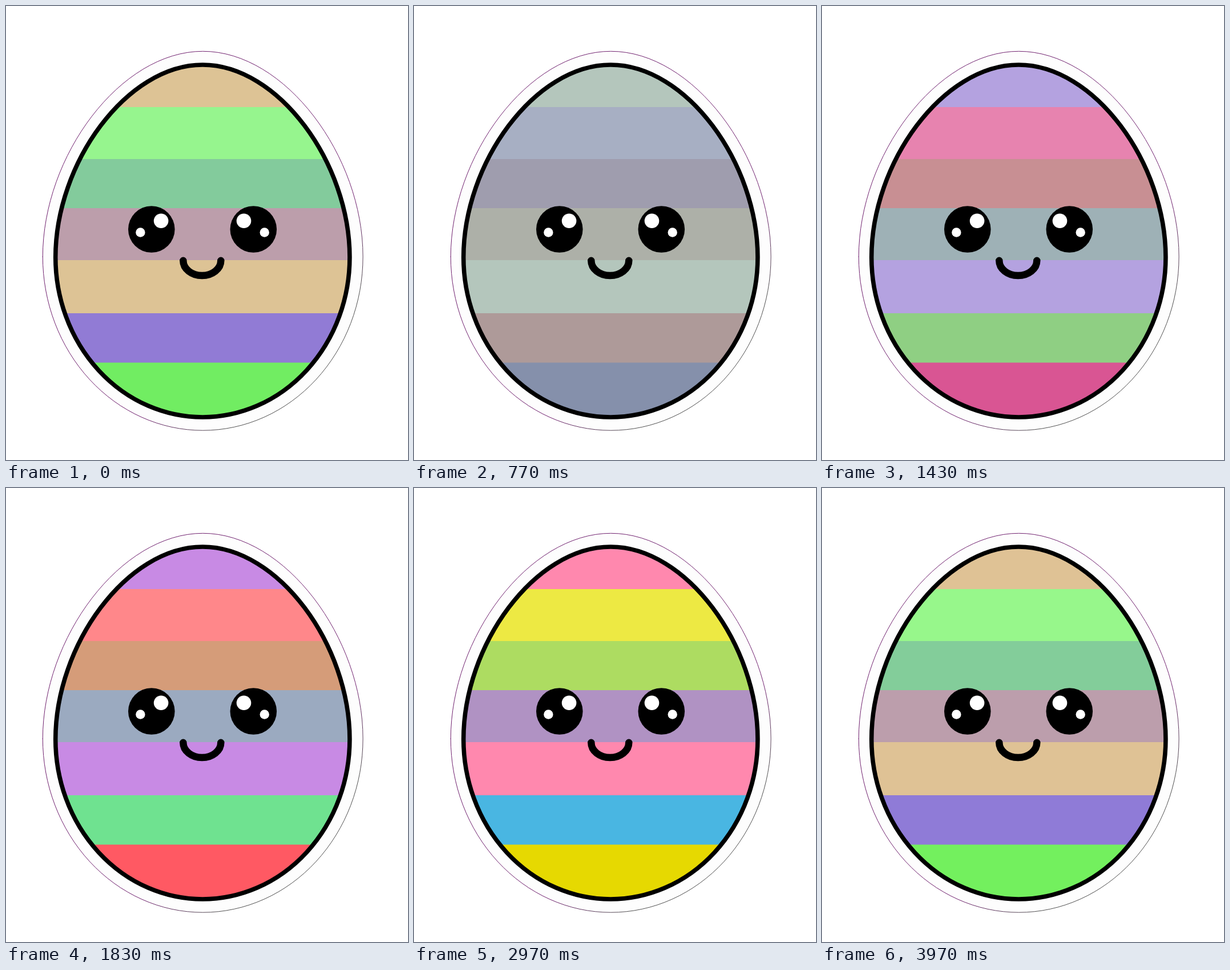
An HTML page with a canvas that plays this animation: 704 by 795 pixels, repeating every 4010 ms.

```html
<!DOCTYPE html>
<html lang="en">
<head>
<meta charset="utf-8">
<title>Egg</title>
<style>
html, body { margin: 0; width: 100%; height: 100%; overflow: hidden; background: #fff; }
canvas { display: block; }
</style>
</head>
<body>
<canvas id="stage" width="704" height="795"></canvas>
<script>
const ctx = document.getElementById('stage').getContext('2d');
const LOOP = 4010, STEPS = 120, STEP = 100 / 3;
const TAU = Math.PI * 2;

// Every stripe blends its own colour with a hue-rotated copy of it.
const BLEND = 0.575;        // share of the rotated copy
const START = 110 / 360;    // turn at time 0

const pink = [252, 128, 186];
const stripes = [
  [95, pink],
  [177, [253, 216, 68]],
  [268, [185, 212, 93]],
  [354, [171, 148, 198]],
  [445, pink],
  [538, [69, 197, 215]],
  [624.5, [251, 194, 3]]
];

// Rotates a colour around the grey axis.
function rotateHue(rgb, turn) {
  return rgb.map((_, k) => rgb.reduce((sum, c, j) =>
    sum + c * (1 + 2 * Math.cos(TAU * (turn - (k - j) / 3))) / 3, 0));
}

function stripeColor(rgb, turn) {
  const mixed = rotateHue(rgb, turn).map((v, k) => rgb[k] + (v - rgb[k]) * BLEND);
  return `rgb(${mixed.map(v => Math.max(0, Math.min(255, Math.round(v))))})`;
}

function eggPath(cx, cy, a, top, bottom) {
  const p = new Path2D();
  const side = cy - 0.49 * (cy - top), cap = 0.515 * a;
  p.moveTo(cx - a, cy);
  p.bezierCurveTo(cx - a, side, cx - cap, top, cx, top);
  p.bezierCurveTo(cx + cap, top, cx + a, side, cx + a, cy);
  p.ellipse(cx, cy, a, bottom - cy, 0, 0, Math.PI);
  p.closePath();
  return p;
}

const shell = eggPath(344.3, 440, 257.6, 103, 720);
const rim = eggPath(344.7, 439, 280.4, 79.3, 743.2);
const rimInk = ctx.createLinearGradient(480, 480, 560, 560);
rimInk.addColorStop(0, '#6f206e');
rimInk.addColorStop(1, '#505050');

function disc(x, y, r, color) {
  ctx.fillStyle = color;
  ctx.beginPath();
  ctx.arc(x, y, r, 0, TAU);
  ctx.fill();
}

function eye(x, side) {
  disc(x, 391, 40.8, '#000');
  disc(x + 16.8 * side, 376.2, 12.8, '#fff');
  disc(x - 19.4 * side, 396.5, 8.2, '#fff');
}

function drawMouth() {
  ctx.lineWidth = 12.5;
  ctx.lineCap = 'round';
  ctx.beginPath();
  ctx.ellipse(343.3, 445.8, 33, 26.3, 0, 0, Math.PI);
  ctx.stroke();
}

function draw(turn) {
  ctx.fillStyle = '#fff';
  ctx.fillRect(0, 0, 704, 795);
  ctx.fillStyle = '#fdfdfd';
  ctx.fill(rim);
  ctx.lineWidth = 1;
  ctx.strokeStyle = rimInk;
  ctx.stroke(rim);

  // Each stripe runs to the bottom and the next one covers it.
  ctx.save();
  ctx.clip(shell);
  for (const [y, rgb] of stripes) {
    ctx.fillStyle = stripeColor(rgb, turn);
    ctx.fillRect(80, y, 530, 730 - y);
  }
  ctx.restore();

  ctx.strokeStyle = '#000';
  ctx.lineWidth = 7.6;
  ctx.stroke(shell);

  eye(254.8, 1);
  eye(433.3, -1);
  drawMouth();
}

const start = performance.now();
function tick() {
  const t = (performance.now() - start) % LOOP;
  const step = Math.min(STEPS - 1, Math.floor((t + 4) / STEP));
  draw(START + step / STEPS);
  requestAnimationFrame(tick);
}
tick();
</script>
</body>
</html>
```
